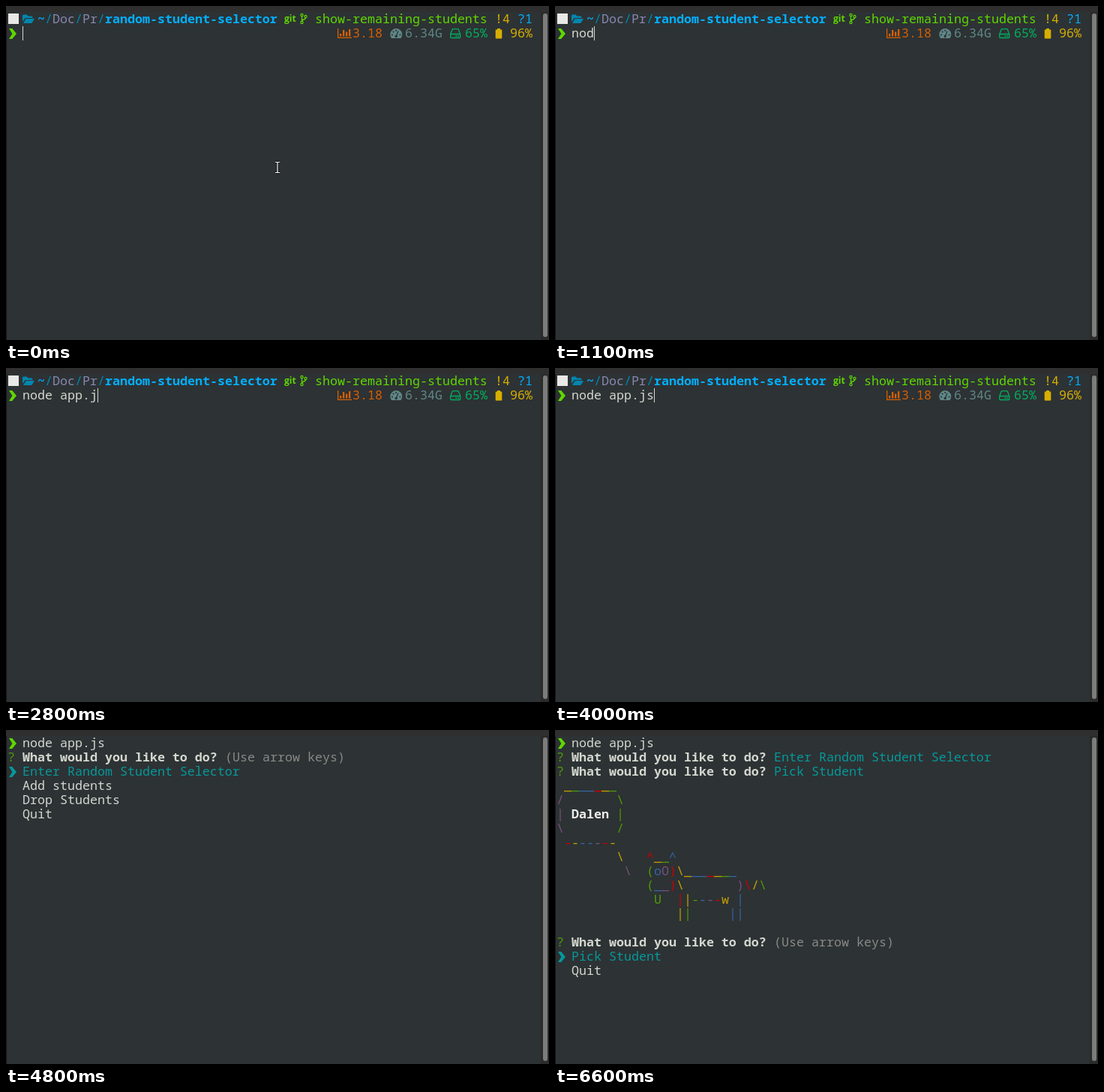
Animation, 724 px wide and 446 px high, one loop 8 s. Source, as an HTML page:

```html
<!DOCTYPE html>
<html lang="en">
<head>
<meta charset="utf-8">
<title>Terminal session</title>
<style>
  html, body { margin: 0; width: 100%; height: 100%; overflow: hidden; background: #2d3234; }
  svg { display: block; }
  text { font: 16.667px "Noto Sans Mono", "DejaVu Sans Mono", monospace; white-space: pre; }
  .b { font-weight: 700; }
  .tag { font: 700 12px "Open Sans", sans-serif; }
</style>
</head>
<body>
<svg id="stage" width="724" height="446" viewBox="0 0 724 446">
  <rect width="724" height="446" fill="#2d3234"/>
  <rect width="724" height="8" fill="#2f2f2f"/>
  <rect y="8" width="1" height="438" fill="#161819"/>
  <rect x="713" y="8" width="11" height="438" fill="#2b2b2b"/>
  <rect x="716" y="10" width="6" height="432" rx="3" fill="#7c7c7b"/>
</svg>
<script>
const LOOP = 8000, CELL = 10, LINE = 19;
const FG = '#d3d7cf', CYAN = '#06989a', GREEN = '#4e9a06', GRAY = '#888a85';
const LIME = '#5fd700', SKY = '#00afff', SEA = '#0087af', DUST = '#8787af';
const GOLD = '#d7af00', ORANGE = '#d75f00', SLATE = '#5f8787', MINT = '#00af5f';
const INK = { r: '#cc0000', y: '#c4a000', g: GREEN, b: '#3465a4', p: '#75507b' };
const BG = '#2d3234';
const stage = document.getElementById('stage');

const colX = c => 2 + c * CELL;
const rowY = r => 8 + r * LINE;

function add(parent, tag, attrs) {
  const el = document.createElementNS('http://www.w3.org/2000/svg', tag);
  for (const k in attrs) el.setAttribute(k, attrs[k]);
  return parent.appendChild(el);
}
const group = () => add(stage, 'g', {});

function print(g, row, col, str, fill = FG, cls = '') {
  const el = add(g, 'text', { x: colX(col), y: rowY(row) + 15, fill, class: cls });
  el.textContent = str;
  return el;
}

// one colour letter per character
function paint(g, row, col, str, inks) {
  [...str].forEach((ch, i) => print(g, row, col + i, ch, INK[inks[i]]));
}

function chevron(g, row, fill) {
  const y = rowY(row);
  add(g, 'path', { d: `M4 ${y + 3}h4.2l5.8 7-5.8 7h-4.2l4.4-7z`, fill });
}

function shape(g, d, fill) {
  add(g, 'path', { d, fill, 'fill-rule': 'evenodd' });
}
function line(g, d, stroke, width) {
  add(g, 'path', { d, stroke, 'stroke-width': width, fill: 'none' });
}

function question(g, row) {
  print(g, row, 0, '?', GREEN);
  print(g, row, 2, 'What would you like to do?', FG, 'b');
}
function answered(g, row, str) {
  question(g, row);
  print(g, row, 29, str, CYAN);
}
function menu(g, row, first, ...rest) {
  question(g, row);
  print(g, row, 29, '(Use arrow keys)', GRAY);
  chevron(g, row + 1, CYAN);
  print(g, row + 1, 2, first, CYAN);
  rest.forEach((s, i) => print(g, row + 2 + i, 2, s));
}

// full shell prompt with status icons
const prompt = group();
add(prompt, 'rect', { x: 3, y: 10, width: 14, height: 14, fill: '#e8e8e6' });
shape(prompt, 'M22 21V13q0-1.5 1.5-1.5h4l2 2h4.500q1.500 0 1.500 1.500v1H27q-1.500 0-2.300 1.200zM23 23l3-5q.6-1 1.800-1H38l-3 5q-.6 1-1.800 1z', SEA);
print(prompt, 0, 4, '~', SKY, 'b');
[5, 9, 12].forEach(c => print(prompt, 0, c, '/', SEA));
print(prompt, 0, 6, 'Doc', DUST);
print(prompt, 0, 10, 'Pr', DUST);
print(prompt, 0, 13, 'random-student-selector', SKY, 'b');
const tag = add(prompt, 'text', { x: 371, y: 21, fill: LIME, class: 'tag' });
tag.textContent = 'git';
line(prompt, 'M394.500 13.500v7.500M399.500 15.500q0 2-2.500 2.500t-2.500 2.500', LIME, 1.3);
[[394.5, 12], [394.5, 22], [399.5, 14]].forEach(([cx, cy]) =>
  add(prompt, 'circle', { cx, cy, r: 1.6, fill: BG, stroke: LIME, 'stroke-width': 1.2 }));
print(prompt, 0, 41, 'show-remaining-students', LIME);
print(prompt, 0, 65, '!4', GOLD);
print(prompt, 0, 68, '?1', SKY);
chevron(prompt, 1, LIME);

shape(prompt, 'M442 30h1.300v11.700H461V43H442zM445 37h2.300v3.500h-2.300zM449 32h2.300v8.500h-2.300zM453 34.500h2.300v6h-2.300zM457 31h2.300v9.500h-2.300z', ORANGE);
print(prompt, 1, 46, '3.18', ORANGE);

shape(prompt, 'M514 43a8 8 0 1 1 12.500 0z', SLATE);
[[515, 38.5], [516.6, 34.5], [520.2, 32.8], [525.4, 38.5]].forEach(([cx, cy]) =>
  add(prompt, 'circle', { cx, cy, r: 1.1, fill: BG }));
line(prompt, 'M520.300 40l2.700-6.500', BG, 1.3);
add(prompt, 'circle', { cx: 520.2, cy: 40.5, r: 1.7, fill: BG });
print(prompt, 1, 53, '6.34G', SLATE);

line(prompt, 'M592.700 37.500l2.300-6q.3-.8 1.200-.8h6q.9 0 1.200.8l2.300 6v4q0 1-1 1h-11q-1 0-1-1zH605.700', MINT, 1.3);
shape(prompt, 'M599.500 39.300h1.600v1.600h-1.600zM602.300 39.300h1.600v1.600h-1.600z', MINT);
print(prompt, 1, 61, '65%', MINT);

shape(prompt, 'M655 30h4v1.500h1.500q.8 0 .8.8V42.700q0 .8-.8.8h-7q-.8 0-.8-.8V32.300q0-.8.8-.8H655z', GOLD);
print(prompt, 1, 67, '96%', GOLD);

// collapsed prompt after Enter
const short = group();
chevron(short, 0, LIME);
print(short, 0, 2, 'node app.js');

const mainMenu = group();
menu(mainMenu, 1, 'Enter Random Student Selector', 'Add students', 'Drop Students', 'Quit');

const pickMenu = group();
answered(pickMenu, 1, 'Enter Random Student Selector');
menu(pickMenu, 2, 'Pick Student', 'Quit');

const result = group();
answered(result, 1, 'Enter Random Student Selector');
answered(result, 2, 'Pick Student');
[
  [3, 1, '_______', 'ygbbryg'],
  [4, 0, '/', 'p'], [4, 8, '\\', 'g'],
  [5, 0, '|', 'p'], [5, 8, '|', 'g'],
  [6, 0, '\\', 'p'], [6, 8, '/', 'g'],
  [7, 1, '-------', 'rybbpry'],
  [8, 8, '\\', 'y'], [8, 12, '^__^', 'rygb'],
  [9, 9, '\\', 'p'], [9, 12, '(oO)\\_______', 'gbpryybbrygb'],
  [10, 12, '(__)\\', 'gbpry'], [10, 24, ')\\/\\', 'pryg'],
  [11, 13, 'U', 'g'], [11, 16, '||----w', 'rygbpry'], [11, 24, '|', 'b'],
  [12, 16, '||', 'yg'], [12, 23, '||', 'bb']
].forEach(part => paint(result, ...part));
print(result, 5, 2, 'Dalen', '#eeeeec', 'b');
menu(result, 14, 'Pick Student', 'Quit');

const typed = print(stage, 1, 2, '');
const caret = add(stage, 'rect', { width: 1, height: LINE, fill: FG });

const mouse = group();
const beam = 'M359 208.500h2q1 0 1 1q0-1 1-1h2M362 209v12.500M359 222.500h2q1 0 1-1q0 1 1 1h2';
line(mouse, beam, '#111', 3);
line(mouse, beam, '#fff', 1.2);

const COMMAND = 'node app.js';
const KEYS = [400, 700, 1100, 1400, 1500, 1700, 1900, 2100, 2400, 2800, 3300];
const ENTER = 4100;

const show = (el, on) => el.setAttribute('visibility', on ? 'visible' : 'hidden');
const within = (t, a, b) => t >= a && t < b;

function render(t) {
  const n = KEYS.filter(k => t >= k).length;
  const typing = t < ENTER;
  show(prompt, typing);
  show(typed, typing);
  typed.textContent = COMMAND.slice(0, n);
  show(short, !typing);
  show(mainMenu, within(t, 4800, 5700));
  show(pickMenu, within(t, 5700, 6600));
  show(result, t >= 6600);
  show(mouse, t < 500);
  caret.setAttribute('x', colX(typing ? 2 + n : 0));
  caret.setAttribute('y', rowY(1));
  show(caret, t < 4600 && !within(t, 100, 400) && !within(t, 3900, 4000));
}

const start = performance.now();
function tick() {
  render((performance.now() - start) % LOOP);
  requestAnimationFrame(tick);
}
tick();
</script>
</body>
</html>
```
